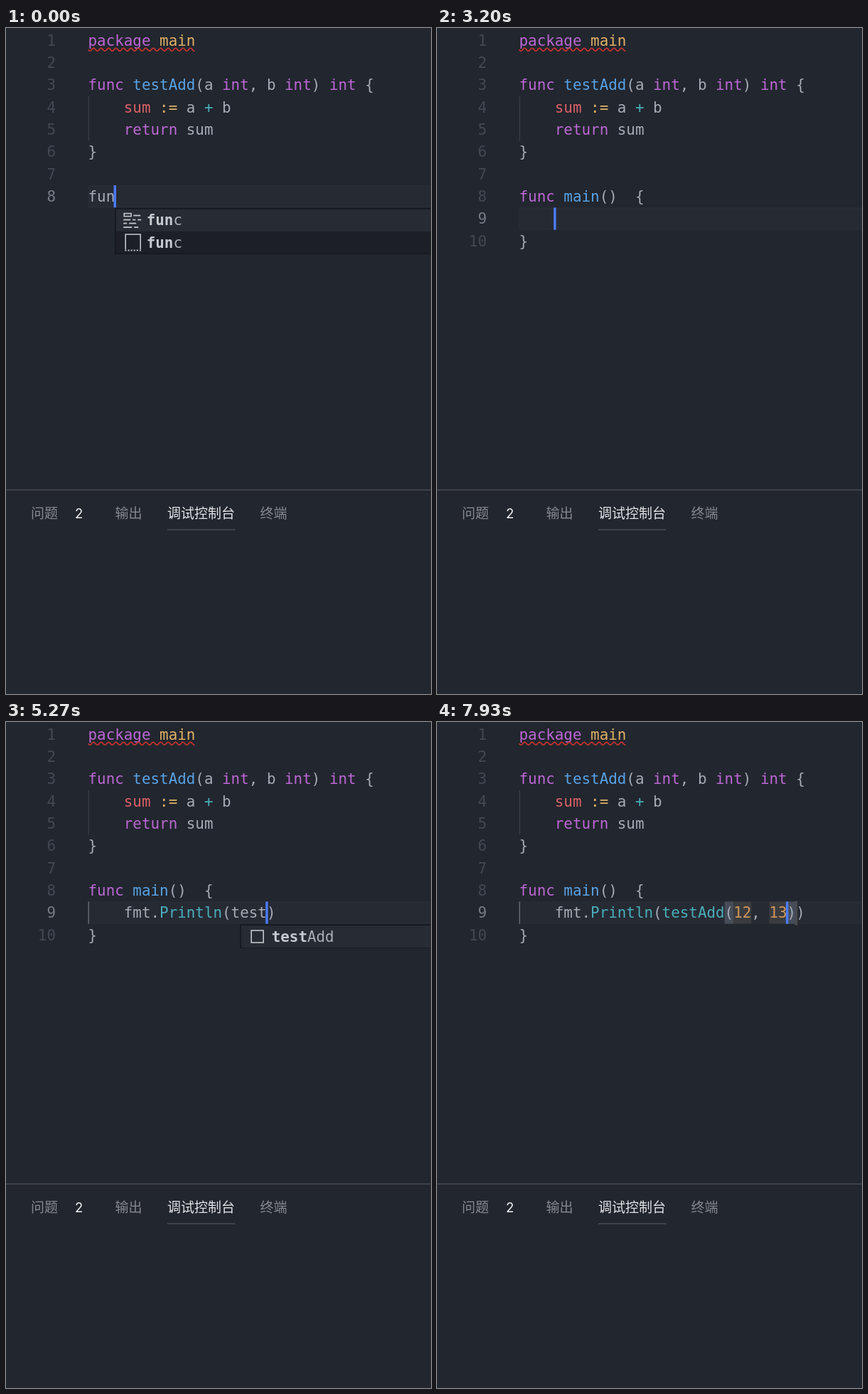
Animation, 598 px wide and 936 px high, one loop 8 s. Source, as an HTML page with a canvas:

```html
<!DOCTYPE html>
<html lang="zh">
<head>
<meta charset="utf-8">
<style>
  html, body { margin: 0; width: 100%; height: 100%; overflow: hidden; background: #22262e; }
  canvas { display: block; }
</style>
</head>
<body>
<canvas id="stage" width="598" height="936"></canvas>
<script>
const ctx = document.getElementById('stage').getContext('2d');
const LOOP = 8000, BLINK = 470;
const CHAR = 12.57, LINE = 31.33, LEFT = 115.5, TOP = 1.7;
const MONO = '20.88px "DejaVu Sans Mono", monospace';
const C = {
  bg: '#22262e', text: '#a5abb6', keyword: '#bb67d4', func: '#57a2e6', call: '#4aaebb',
  type: '#deb167', red: '#dc6067', number: '#d0965a', cursor: '#4a7af6',
  select: '#454a56', bracket: '#464d58', slot: '#3a3b3f', bar: '#4a4a4d'
};
const HEAD = ['package main', '', 'func testAdd(a int, b int) int {',
  '    sum := a + b', '    return sum', '}', ''];

const X = col => LEFT + col * CHAR;
const Y = row => TOP + (row - 1) * LINE;

// Each state lasts until the next one. Ranges are [row, column, length]; length 0 is a bar.
const states = [];
const add = (t, code, cursor, extra = {}) => states.push({ t, code, cursor, ...extra });

const keywords = { typed: 3, col: 3, row: 8, items: ['func', 'func'], icons: ['keyword', 'snippet'] };
add(0, ['fun'], [8, 3], { popup: { ...keywords, active: 0 } });
add(870, ['fun'], [8, 3], { popup: { ...keywords, active: 1 } });

const mainLine = name => `func ${name}()  {`;
[[1400, ''], [1930, 'm'], [2070, 'ma'], [2270, 'mai'], [2400, 'main']].forEach(([t, name]) => {
  const end = 5 + name.length;
  add(t, [mainLine(name), '', '}'], [8, end], {
    brackets: [[8, end, 1], [8, end + 1, 1]],
    slots: [[8, 5, name.length], [8, end + 1, 0], [8, end + 3, 0], [9, 4, 0]]
  });
});
const full = mainLine('main');
add(2800, [full, '', '}'], [8, 10],
  { brackets: [[8, 9, 1], [8, 10, 1]], slots: [[8, 5, 4], [8, 12, 0], [9, 4, 0]] });
add(2970, [full, '', '}'], [8, 12], { slots: [[8, 5, 4], [8, 10, 0], [9, 4, 0]] });
add(3130, [full, '', '}'], [9, 4]);

const body = (t, text, col, extra) => add(t, [full, '    ' + text, '}'], [9, col], extra);
const hint = (typed, col, ...items) => ({ popup: { typed, col, row: 9, items, active: 0 } });
[[3630, 'f'], [3760, 'fm'], [3900, 'fmt']].forEach(([t, s]) =>
  body(t, s, 4 + s.length, hint(s.length, 5, 'fmt')));
body(4050, 'fmt.', 8, hint(0, 8, 'Print', 'Printf', 'Println'));
body(4170, 'fmt.Pln', 11, hint(1, 8, 'Println'));
body(4330, 'fmt.Println', 15);
body(4470, 'fmt.Println()', 16, { brackets: [[9, 15, 1], [9, 16, 1]] });
[[4800, 't'], [4930, 'te'], [5070, 'tes'], [5200, 'test']].forEach(([t, s]) =>
  body(t, `fmt.Println(${s})`, 16 + s.length, hint(s.length, 17, 'testAdd')));

const call = (a, b) => `fmt.Println(testAdd(${a}, ${b}))`;
function args(t, a, b, second, selected) {
  const from = second ? 26 + a.length : 24;
  const word = second ? b : a, end = from + word.length;
  const close = 26 + a.length + b.length;
  body(t, call(a, b), end, {
    slots: [[9, 24, a.length], [9, 26 + a.length, b.length], [9, close + 1, 0]],
    select: selected && [9, from, word.length],
    match: selected && [3, second ? 20 : 13, 5],
    brackets: second && !selected ? [[9, 23, 1], [9, close, 1]] : []
  });
}
args(5600, 'a int', 'b int', false, true);
args(6330, '1', 'b int', false, false);
args(6530, '12', 'b int', false, false);
args(6870, '12', 'b int', true, true);
args(7530, '12', '1', true, false);
args(7800, '12', '13', true, false);

function rect(color, x, y, w, h) {
  ctx.fillStyle = color;
  ctx.fillRect(x, y, w, h);
}

function text(s, x, y, color, font = MONO, align = 'left') {
  ctx.font = font;
  ctx.textAlign = align;
  ctx.fillStyle = color;
  ctx.fillText(s, x, y);
}

function mono(s, x, y, color, font) {
  [...s].forEach((ch, i) => text(ch, x + i * CHAR, y, color, font));
}

function mark([row, col, len], color) {
  if (len) rect(color, X(col), Y(row), len * CHAR, LINE);
  else rect(C.bar, X(col) - 1.5, Y(row) - 1, 3.5, LINE + 3);
}

function tokenColor(word, line, end) {
  if (/^(package|func|int|return)$/.test(word)) return C.keyword;
  if (line.startsWith('package') || word === ':=') return C.type;
  if (word === '+') return C.call;
  if (/^\d/.test(word)) return C.number;
  if (/^\w/.test(word) && line[end] === '(') return line.startsWith('func') ? C.func : C.call;
  if (line.startsWith(' :=', end)) return C.red;
  return C.text;
}

function codeLine(line, row) {
  for (const m of line.matchAll(/\w+|:=|[^\s\w]/g))
    mono(m[0], X(m.index), Y(row) + 22.9, tokenColor(m[0], line, m.index + m[0].length));
}

function squiggle() {
  ctx.strokeStyle = '#c5332f';
  ctx.lineWidth = 1.7;
  ctx.beginPath();
  for (let x = LEFT; x <= X(12); x++) ctx.lineTo(x, 30.3 + 2 * Math.sin((x - LEFT) * Math.PI / 5.24));
  ctx.stroke();
}

function icon(kind, x, y) {
  const ink = '#c3c6ca';
  ctx.strokeStyle = ink;
  ctx.lineWidth = 1.6;
  if (kind === 'keyword') {
    ctx.strokeRect(x + 1, y + 6, 10, 4);
    [[14, 8, 10], [0, 14, 10], [13, 14, 4], [20, 14, 5], [0, 19, 5], [8, 19, 10], [0, 24.5, 12], [15, 24.5, 6]]
      .forEach(([dx, dy, w]) => rect(ink, x + dx, y + dy, w, 1.8));
  } else if (kind === 'snippet') {
    ctx.beginPath();
    ctx.moveTo(x + 3, y + 25);
    ctx.lineTo(x + 3, y + 4);
    ctx.lineTo(x + 24, y + 4);
    ctx.lineTo(x + 24, y + 25);
    ctx.stroke();
    for (let i = 0; i < 6; i++) rect(ink, x + 2.2 + i * 4.1, y + 25.5, 2, 2);
  } else {
    ctx.strokeRect(x + 4, y + 7, 17, 17);
  }
}

function popup({ row, col, typed, items, icons = [], active }) {
  const x = X(col), y = Y(row + 1) + 0.6;
  rect('#15181d', x, y, 600, items.length * LINE + 2.5);
  rect('#1c2026', x + 1.7, y + 1.7, 600, items.length * LINE - 0.8);
  items.forEach((item, i) => {
    const top = y + 1.7 + i * LINE;
    if (i === active) rect('#262b34', x + 1.7, top, 600, LINE);
    icon(icons[i], x + 12, top);
    mono(item.slice(0, typed), x + 44.5, top + 22.7, '#c6cad0', 'bold ' + MONO);
    mono(item.slice(typed), x + 44.5 + typed * CHAR, top + 22.7, '#a9aeb7');
  });
}

function panel() {
  rect('#454851', 0, 648.5, 598, 1.6);
  const cjk = '19px "Noto Sans CJK SC", "Noto Sans CJK", sans-serif';
  [['问题', 35], ['输出', 153.5], ['终端', 357.5]].forEach(([s, x]) => text(s, x, 689, '#858890', cjk));
  text('调试控制台', 227, 689, '#e1e3e6', cjk);
  text('2', 97, 688.5, '#f2f3f5', '18.5px Inter, sans-serif');
  rect('#454a53', 227, 704.3, 95.5, 1.6);
}

function draw(t) {
  const s = states.findLast(e => e.t <= t);
  const [row, col] = s.cursor;
  const lines = HEAD.concat(s.code);
  rect(C.bg, 0, 0, 598, 936);

  if (!s.select) {
    rect('#292d36', LEFT, Y(row), 483, LINE);
    rect('#262a33', LEFT, Y(row) + 1.5, 483, LINE - 3);
  }
  rect('#353a44', LEFT, Y(4), 1.5, 2 * LINE);
  if (s.code[1]) rect(s.select ? '#373c45' : '#626771', LEFT, Y(9), 1.5, LINE);

  (s.slots || []).forEach(r => mark(r, C.slot));
  (s.brackets || []).forEach(r => mark(r, C.bracket));
  if (s.select) mark(s.select, C.select);
  if (s.match) {
    const [r, c, n] = s.match;
    mark(s.match, '#37393c');
    ctx.strokeStyle = '#e4e5e5';
    ctx.lineWidth = 1.7;
    ctx.strokeRect(X(c) + 0.9, Y(r) + 1.2, n * CHAR - 1.5, LINE - 1.7);
  }

  lines.forEach((line, i) => {
    text(i + 1, 70, Y(i + 1) + 22.9, i + 1 === row ? '#767b86' : '#434853', MONO, 'right');
    codeLine(line, i + 1);
  });
  squiggle();
  if (Math.floor((t - s.t) / BLINK) % 2 === 0) rect(C.cursor, X(col) - 1.7, Y(row), 3.5, LINE);
  if (s.popup) popup(s.popup);
  panel();
}

const start = performance.now();
function tick() {
  draw((performance.now() - start) % LOOP);
  requestAnimationFrame(tick);
}
tick();
</script>
</body>
</html>
```
